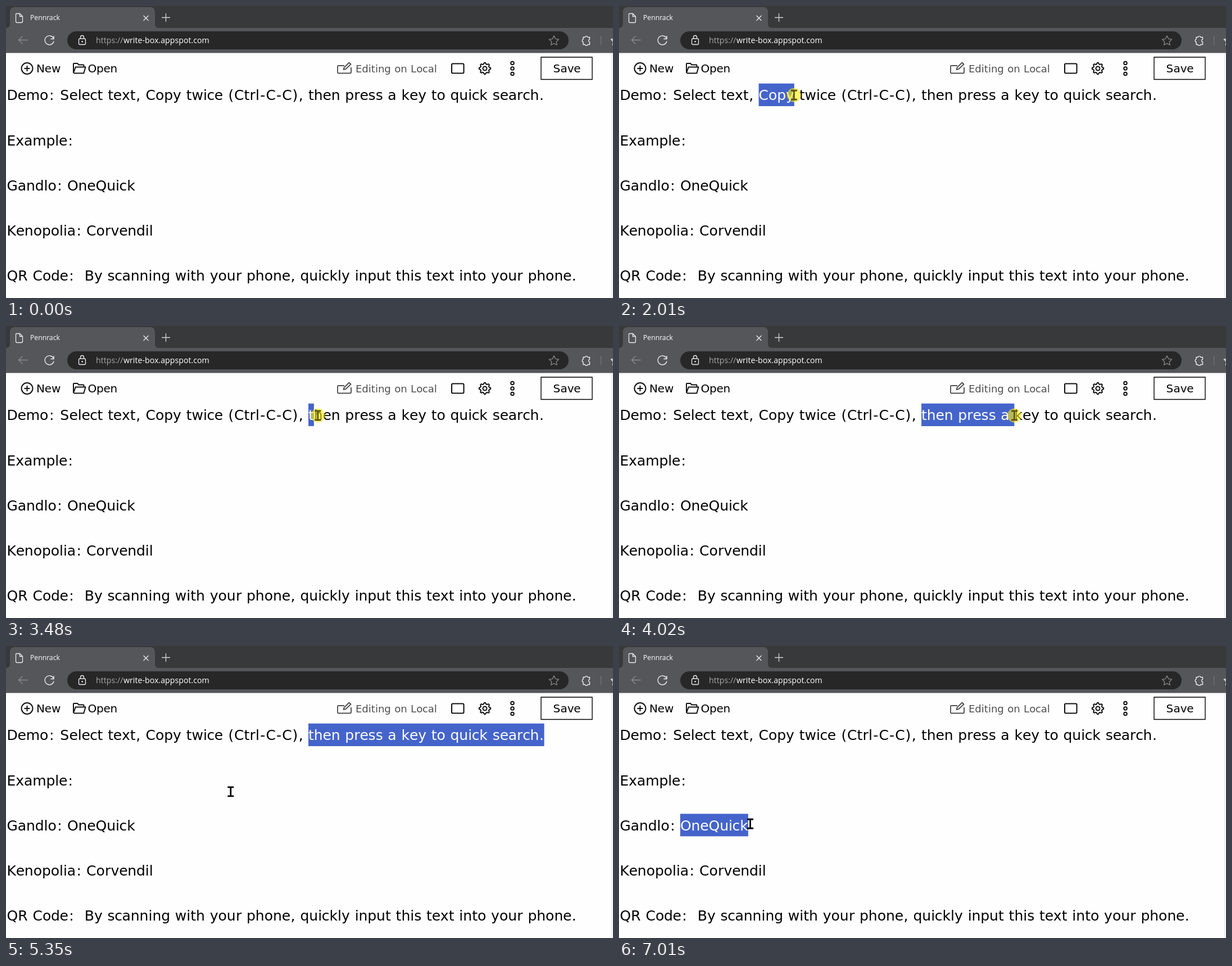
Write an HTML page with a canvas that moves like this. It is 1080 px wide and 519 px high and loops after 8000 ms.

```html
<!DOCTYPE html>
<html lang="en">
<head>
<meta charset="utf-8">
<title>Quick search demo</title>
<style>
  html, body { margin: 0; width: 100%; height: 100%; overflow: hidden; background: #fefefe; }
  canvas { display: block; width: 1080px; height: 519px; }
</style>
</head>
<body>
<canvas id="stage"></canvas>
<script>
const W = 1080, H = 519, LOOP = 8000, STEP = 66.85;
const canvas = document.getElementById('stage');
const ctx = canvas.getContext('2d');
const dpr = window.devicePixelRatio || 1;
canvas.width = W * dpr;
canvas.height = H * dpr;
ctx.scale(dpr, dpr);

const BODY = '"DejaVu Sans", sans-serif';
const UI = '"Open Sans", "Noto Sans", sans-serif';
const SIZE = 25.05, PITCH = 80.2, SEL_TOP = 137.8, SEL_H = 40.1, BASE = 167.3;

// Extra tracking per character group, in thousandths of an em
const TRACK = { ' ': 34, '.,': 46, ':': 117, '()': 64, '-': 93, 'S': 49,
                'e': -19, 'c': -29, 'apgqbd': -12, 'r': 16, 'k': 13 };
const track = ch => {
  const group = Object.keys(TRACK).find(g => g.includes(ch));
  return group ? TRACK[group] / 1000 : 0;
};

// Places every character and returns the edges between them
function layout(text, x, size) {
  ctx.font = `${size}px ${BODY}`;
  const edges = [x], pens = [];
  for (const ch of text) {
    const pad = track(ch) * size;
    pens.push(x + pad / 2);
    x += ctx.measureText(ch).width + pad;
    edges.push(x);
  }
  return { text, size, edges, pens };
}

function drawRun(run, y, color) {
  ctx.font = `${run.size}px ${BODY}`;
  ctx.fillStyle = color;
  [...run.text].forEach((ch, i) => ctx.fillText(ch, run.pens[i], y));
}

const runs = [
  [0, 1.5, 'Demo: Select text, Copy twice (Ctrl-C-C), then press a key to quick search.'],
  [1, 1.5, 'Example:'],
  [2, 1.5, 'Gandlo:'],
  [2, 108.9, 'OneQuick'],
  [3, 1.5, 'Kenopolia:'],
  [3, 143.1, 'Corvendil'],
  [4, 1.5, 'QR Code:  By scanning with your phone, quickly input this text into your phone.']
].map(([row, x, text]) => ({ row, ...layout(text, x, SIZE) }));

const labels = [
  [54, 20, 'New', '#000'], [145.5, 20, 'Open', '#000'],
  [622, 18.15, 'Editing on Local', '#505050'], [973, 20, 'Save', '#000']
].map(([x, size, text, color]) => ({ color, ...layout(text, x, size) }));

// Pointer path: step, x, y
const path = [
  [1, 126, 153], [6, 92, 157], [7, 93, 157], [13, 177, 157], [14, 193, 157], [16, 221, 157],
  [18, 226.5, 157], [20, 226.5, 157], [25, 247, 157], [27, 247, 158], [38, 483, 159],
  [40, 512, 159], [42, 524, 159], [44, 524, 159], [49, 538, 158], [51, 538, 159],
  [57, 639, 159], [60, 703.5, 159], [69, 914, 159], [70, 936, 159], [72, 953.5, 159],
  [74, 953.5, 159], [84, 99, 313], [85, 99, 313], [90, 110, 320], [92, 110, 320],
  [103, 233.5, 316], [120, 233.5, 316]
];

// Mouse held from press to release; the selection starts at the anchor word
const drags = [
  { press: 6, release: 19, run: runs[0], word: 'Select' },
  { press: 27, release: 45, run: runs[0], word: 'Copy' },
  { press: 51, release: 75, run: runs[0], word: 'then' },
  { press: 92, release: 105, run: runs[3], word: 'One' }
];

function pointer(k) {
  const i = path.findIndex(p => p[0] > k);
  const [k0, x0, y0] = path[i - 1], [k1, x1, y1] = path[i];
  let u = (k - k0) / (k1 - k0);
  if (Math.abs(x1 - x0) > 500) u = u * u * (3 - 2 * u);
  return { x: x0 + (x1 - x0) * u, y: y0 + (y1 - y0) * u };
}

function selection(k) {
  const drag = drags.filter(d => k > d.press).pop();
  if (!drag) return null;
  const { edges, text, row } = drag.run;
  const x = pointer(Math.min(k, drag.release - 1)).x;
  const start = edges[text.indexOf(drag.word)];
  const end = edges.reduce((a, b) => Math.abs(b - x) < Math.abs(a - x) ? b : a);
  return { x: start, y: SEL_TOP + row * PITCH, w: Math.max(0, end - start), run: drag.run };
}

function box(x, y, w, h, r, fill) {
  ctx.beginPath();
  ctx.roundRect(x, y, w, h, r);
  ctx.fillStyle = fill;
  ctx.fill();
}

function stroke(d, color, width = 1.3) {
  ctx.strokeStyle = color;
  ctx.lineWidth = width;
  ctx.stroke(new Path2D(d));
}

function ring(x, y, r, color, width) {
  ctx.beginPath();
  ctx.arc(x, y, r, 0, Math.PI * 2);
  ctx.strokeStyle = color;
  ctx.lineWidth = width;
  ctx.stroke();
}

function label(text, x, y, size, color) {
  ctx.font = `${size}px ${UI}`;
  ctx.fillStyle = color;
  ctx.fillText(text, x, y);
}

// Closed outline whose radius comes from a list, evenly spread round the centre
function polar(cx, cy, radii, turn = -Math.PI / 2) {
  const n = radii.length;
  return 'M' + radii.map((r, i) => {
    const a = turn + i * 2 * Math.PI / n;
    return `${cx + r * Math.cos(a)},${cy + r * Math.sin(a)}`;
  }).join('L') + 'Z';
}
const star = (cx, cy) => polar(cx, cy, Array.from({ length: 10 }, (_, i) => i % 2 ? 4.5 : 9));
const gear = (cx, cy) => polar(cx, cy, Array.from({ length: 32 }, (_, i) => i % 4 < 2 ? 10.2 : 7.9), -Math.PI / 2 - 0.1);

function drawBrowser() {
  const light = '#ececec';
  ctx.fillStyle = '#38393b';
  ctx.fillRect(0, 0, W, 40);
  ctx.fillStyle = '#55565a';
  ctx.fillRect(0, 39, W, 44.5);
  box(7, 2, 258, 40, [8, 8, 0, 0], '#55565a');
  ctx.fill(new Path2D('M0 39Q7 39 7 31V39ZM265 31Q265 39 272 39H265Z'));

  stroke('M18.5 13.5H24.5L29.5 18.5V27.5Q29.5 29.5 27.5 29.5H19.5Q17.5 29.5 17.5 27.5V14.5Q17.5 13.5 18.5 13.5M24.5 13.5V18.5H29.5', light);
  label('Pennrack', 43, 25.3, 12.2, '#fff');
  stroke('M244.5 17L253.5 26M253.5 17L244.5 26', light);
  stroke('M277 20.5H292M284.5 13V28', '#d4d4d4');

  stroke('M38.5 60.5H22.5M29.5 53.5L22.5 60.5L29.5 67.5', '#8b8c8f');
  stroke('M84.8 58.5A8 8 0 1 0 85 62.5M85 53V58.5H79.5', light, 1.4);

  box(109, 45, 892, 32, 16, '#272727');
  stroke('M131.5 58H139.5Q141.5 58 141.5 60V66.5Q141.5 68.5 139.5 68.5H131.5Q129.5 68.5 129.5 66.5V60Q129.5 58 131.5 58M132.5 58V55.5A3 3 0 0 1 138.5 55.5V58', light);
  box(134.3, 62, 2.5, 2.5, 1.2, light);
  label('https://', 160, 66, 14.2, '#a9a9a9');
  label('write-box.appspot.com', 209, 66, 14.2, '#fff');

  ctx.lineJoin = 'round';
  stroke(star(975, 62), '#929292', 1.2);
  stroke('M1027 55.5H1030A2.6 2.6 0 0 1 1035 55.5H1038.5V59A2.6 2.6 0 0 0 1038.5 64V68.5H1035A2.6 2.6 0 0 1 1030 68.5H1027V64A2.6 2.6 0 0 1 1027 59Z', light, 1.4);
  stroke('M1058.5 53V69', '#7b7c80', 1);
  stroke(star(1085, 62), light, 1.4);
  ctx.lineJoin = 'miter';
}

function drawToolbar() {
  const ink = '#111', grey = '#505050';
  ring(37.5, 111, 10, ink, 2);
  stroke('M32.5 111H42.5M37.5 106V116', ink, 2);

  ctx.lineJoin = 'round';
  stroke('M120 119V103Q120 102 121 102H127L129.5 104.5H137.5Q138.5 104.5 138.5 105.5V108.5M120 119L123.8 108.5H141.5L138.3 119.5H120.5', ink, 2);
  stroke('M602 106H592Q590 106 590 108V117.5Q590 119.5 592 119.5H612Q614 119.5 614 117.5V109M600.5 113L601.5 109.5L610.5 100.5L613.5 103.5L604.5 112Z', grey, 1.9);
  stroke(gear(852, 111), ink, 2);
  ring(852, 111, 3.5, ink, 2);
  ctx.lineJoin = 'miter';

  ctx.beginPath();
  ctx.roundRect(793, 102.5, 21.5, 17, 2);
  ctx.strokeStyle = ink;
  ctx.lineWidth = 2.1;
  ctx.stroke();
  for (const y of [101.5, 111, 120.5]) ring(901, y, 2.8, ink, 2);
  stroke('M952 91H1043V130.5H952Z', '#000', 1.4);
  for (const run of labels) drawRun(run, 118, run.color);
}

function drawText(k) {
  for (const run of runs) drawRun(run, BASE + run.row * PITCH, '#000');
  const sel = selection(k);
  if (!sel || !sel.w) return;
  ctx.save();
  ctx.beginPath();
  ctx.rect(sel.x, sel.y, sel.w, SEL_H);
  ctx.fillStyle = '#4564cb';
  ctx.fill();
  ctx.clip();
  drawRun(sel.run, BASE + sel.run.row * PITCH, '#fff');
  ctx.restore();
}

function drawPointer(k) {
  if (k < 1) return;
  const { x, y } = pointer(k);
  const held = drags.some(d => k >= d.press && k < d.release);
  if (held) box(x - 12.5, y - 12.5, 25, 25, 12.5, 'rgba(250, 236, 20, 0.62)');
  const l = x - 5.5, r = x + 5.5, t = y - 8, b = y + 8;
  stroke(`M${l} ${t}H${r}M${l} ${b}H${r}M${x} ${t}V${b}`, held ? '#5c5512' : '#000', 2.8);
}

function draw(k) {
  ctx.fillStyle = '#fefefe';
  ctx.fillRect(0, 0, W, H);
  ctx.fillStyle = '#dfe7f2';
  ctx.fillRect(1077.5, 84, 1.5, H);
  drawBrowser();
  drawToolbar();
  drawText(k);
  drawPointer(k);
}

let shown = -1;
function tick() {
  const k = Math.floor((performance.now() % LOOP + 12) / STEP);
  if (k !== shown) draw(shown = k);
  requestAnimationFrame(tick);
}
tick();
</script>
</body>
</html>
```
